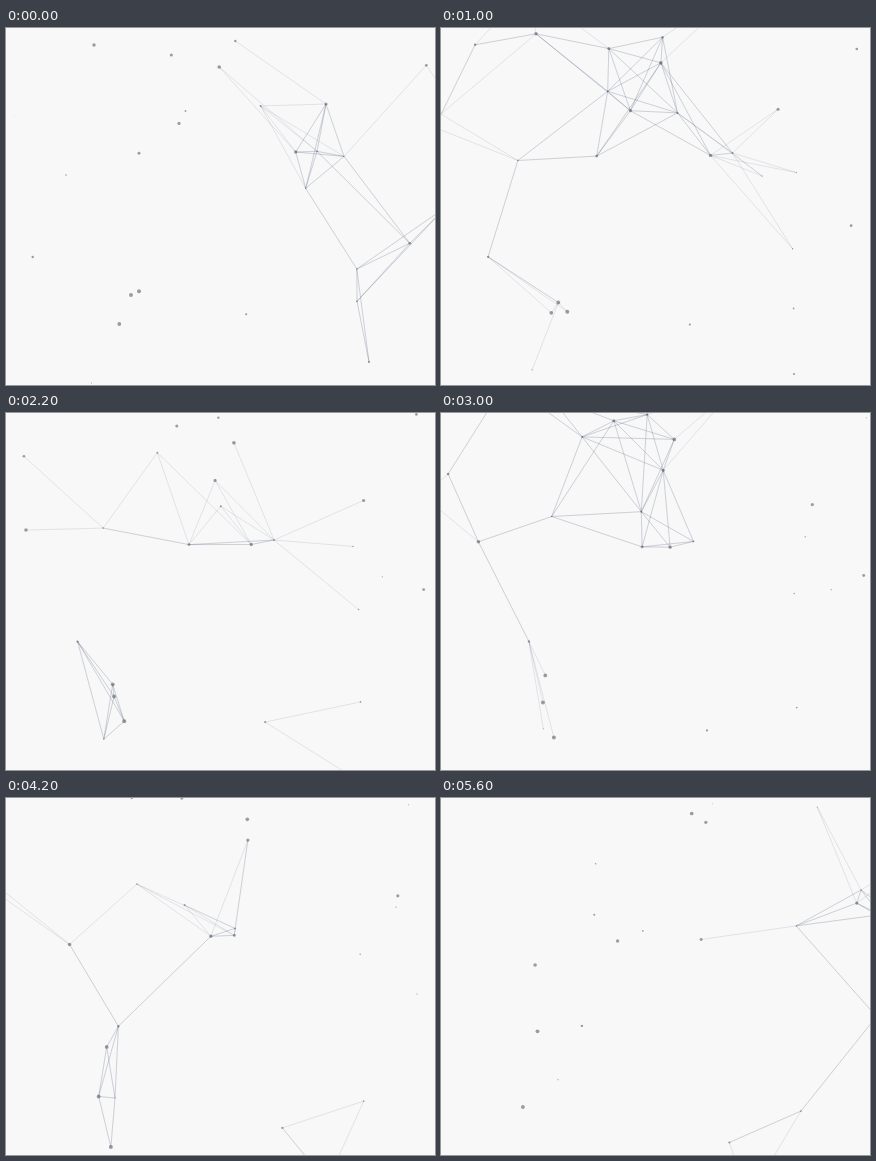
These frames come from a looping animation (429 by 357 pixels, 5.7 s). An HTML page with a canvas:

```html
<!DOCTYPE html>
<html lang="en">
<head>
<meta charset="utf-8">
<title>Constellation</title>
<style>
html, body { margin: 0; width: 100%; height: 100%; overflow: hidden; background: #f8f8f8; }
canvas { display: block; }
</style>
</head>
<body>
<canvas id="sky" width="429" height="357"></canvas>
<script>
const LOOP = 5700, STEP = 100;
const REACH = 100;   // two stars link when both offsets are below this
const RADIUS = 150;  // half side of the square of active stars around the pointer
const canvas = document.getElementById('sky');
const ctx = canvas.getContext('2d');

// Start point and drift in px per second, from the largest star to the smallest
const stars = [
  [133, 263.3, -6.7, 20.4], [125, 267, -7.7, 7.5], [113.3, 296, -3, -11.2],
  [213.2, 39, 6.7, -4.2], [-28, 84.7, 21.8, 14.7], [88, 17, 7, -11.2],
  [289.7, 124, -20.2, 3.4], [173, 95.4, 16.4, -12.7], [320, 76, 17.1, 5.2],
  [165.3, 27, 2.5, -6.4], [133, 125.2, 22.7, 2.9], [403.8, 215.3, 6.3, -17.6],
  [420.3, 37.3, -4.5, -16.3], [47.6, -5.3, -13.5, 22.1], [229.3, 13, -7.7, -3.8],
  [26.7, 229, 20.4, -0.2], [363, 334, -10, 12], [240.2, 286.2, 8.6, 10.4],
  [254.6, 78, -18.1, 6.9], [179.5, 83, -12.8, -19.7], [311, 123.3, -19.5, 1.7],
  [351, 273.3, 1.6, 7.1], [60, 147, 16.9, -14.5], [350.8, 241, 0.8, -20.2],
  [299.7, 160.3, 21.5, -12.2], [338, 128.4, 17.4, 16.1], [85.5, 355, 5.6, -13.1],
  [482, 0, -18.9, 1.6], [325, -67, -9.6, 13], [440, 179, 13, -3],
  [456, 89, 7, -7.6], [98, -44.5, -11, 4.5], [9, 87.5, -9, -1.5]
].map(([x, y, vx, vy], i) => ({ x, y, vx, vy, r: 2 - i * 0.055 }));

// Pointer path: seconds, x, y
const path = [
  [0, 420, 206], [1, 160, 129], [2.2, 185, 255], [3, 140, 100],
  [3.7, 283, 227], [4.8, 100, 340], [5.6, 424, 234]
];

function pointerAt(t) {
  const i = Math.max(1, path.findIndex(p => p[0] >= t));
  const [t0, x0, y0] = path[i - 1], [t1, x1, y1] = path[i];
  const k = (t - t0) / (t1 - t0);
  const e = k * k * (3 - 2 * k);
  return { x: x0 + (x1 - x0) * e, y: y0 + (y1 - y0) * e };
}

const within = (a, b, d) => Math.abs(a.x - b.x) < d && Math.abs(a.y - b.y) < d;

function drawDot({ x, y, r }) {
  ctx.beginPath();
  ctx.arc(x, y, r, 0, Math.PI * 2);
  ctx.fill();
}

function drawLink(a, b) {
  ctx.beginPath();
  ctx.moveTo(a.x, a.y);
  ctx.lineTo(b.x, b.y);
  ctx.stroke();
}

function draw(t) {
  const pointer = pointerAt(t);
  const now = stars.map(s => ({ x: s.x + s.vx * t, y: s.y + s.vy * t, r: s.r }));

  ctx.clearRect(0, 0, canvas.width, canvas.height);
  ctx.fillStyle = '#9b9c9f';
  now.forEach(drawDot);

  // A link with two active ends is stroked twice and so looks darker
  ctx.strokeStyle = 'rgba(76, 94, 120, 0.68)';
  ctx.lineWidth = 0.2;
  for (const a of now.filter(s => within(s, pointer, RADIUS))) {
    for (const b of now) {
      if (a !== b && within(a, b, REACH)) drawLink(a, b);
    }
  }
}

const start = performance.now();
function tick() {
  const ms = (performance.now() - start) % LOOP;
  draw(Math.floor(ms / STEP) * STEP / 1000);
  requestAnimationFrame(tick);
}
tick();
</script>
</body>
</html>
```
